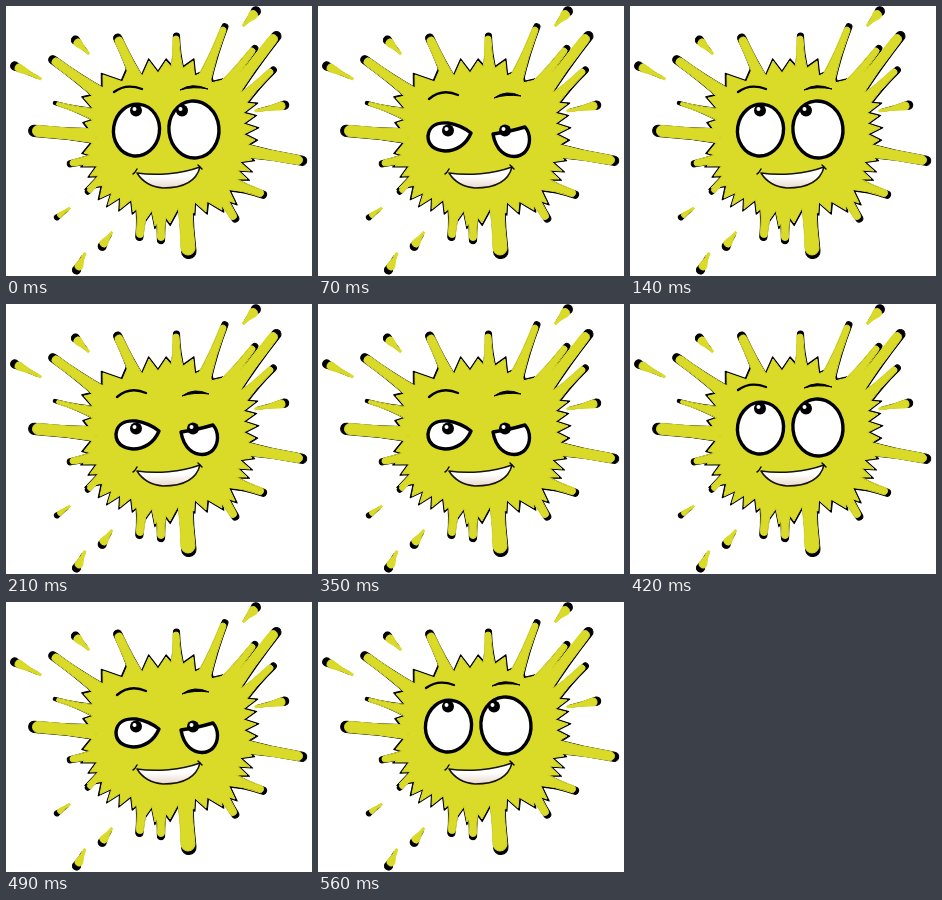
These frames come from a looping animation (306x270 px, 630 ms). An HTML page:

```html
<!DOCTYPE html>
<html lang="en">
<head>
<meta charset="utf-8">
<title>Happy splat</title>
<style>
  html, body { margin: 0; width: 100%; height: 100%; overflow: hidden; background: #fff; }
  svg { display: block; width: 306px; height: 270px; }
  .line { fill: none; stroke: #000; stroke-width: 2.3; stroke-linecap: round; }
  .eye { fill: #fff; stroke: #000; stroke-width: 3.4; stroke-linejoin: round; }
  #squint { opacity: 0; }
</style>
</head>
<body>
<svg viewBox="0 0 306 270">
  <defs>
    <linearGradient id="teeth" x2="0" y2="1">
      <stop offset=".45" stop-color="#fff"/>
      <stop offset="1" stop-color="#ead8cc"/>
    </linearGradient>
    <g id="splat" stroke-linejoin="round"></g>
    <g id="pupil"><circle r="6"/><circle cx="-1.5" cy="-1.5" r="2" fill="#fff"/></g>
  </defs>

  <use href="#splat" fill="#000" stroke="#000" transform="translate(155 130) scale(1.03) translate(-155 -130)"/>
  <use href="#splat" fill="#dadb29" stroke="#dadb29"/>

  <path d="M131 167C150 170 175 168 194 161C190 177 174 182 157 182C145 181 136 175 131 167Z"
    fill="url(#teeth)" stroke="#15120b" stroke-width="1.5" stroke-linejoin="round"/>
  <path class="line" d="M127 168Q129 167 131 163M192 159L196 163" style="stroke-width: 1.4"/>

  <g id="open">
    <path class="line" d="M108 86Q120 77 136 83"/>
    <path d="M174 84Q186 76 202 83Q187 80 174 84Z" stroke="#000"/>
    <ellipse class="eye" cx="130.5" cy="124" rx="23" ry="26" transform="rotate(8 130 124)"/>
    <ellipse class="eye" cx="188" cy="123.5" rx="25" ry="28.5" transform="rotate(-6 188 124)"/>
    <use href="#pupil" x="130" y="104.5"/>
    <use href="#pupil" x="176" y="104.5"/>
  </g>

  <g id="squint">
    <path class="line" d="M111 93Q124 82 140 89"/>
    <path d="M176 92Q188 83 203 90Q188 88 176 92Z" stroke="#000"/>
    <path class="eye" d="M110 130C111 120 119 116 130 117Q143 119 153 127C148 139 138 145 127 145C116 144 110 139 110 130Z"/>
    <path class="eye" d="M175 128Q190 126 207 121C213 128 213 139 207 146C201 152 191 152 184 146Q177 140 175 128Z"/>
    <use href="#pupil" x="130" y="124.5"/>
    <use href="#pupil" x="187" y="124.5"/>
  </g>
</svg>
<script>
  const CENTER = [155, 130], VALLEY_DEPTH = 12;
  const spikes = [
    [97, 69], [122, 63], [143, 55], [160, 55], [187, 55], [202, 64], [226, 72],
    [245, 87], [249, 98], [248, 110], [250, 122], [249, 134], [246, 154], [244, 165],
    [241, 173], [235, 185], [229, 197], [216, 204], [200, 206], [188, 207], [164, 217],
    [149, 220], [140, 213], [127, 206], [114, 203], [102, 199], [94, 192], [81, 182],
    [84, 170], [77, 160], [78, 147], [79, 117], [75, 105], [78, 92]
  ];
  // Base x, y, then tip x, y and radius.
  const arms = [
    [134, 80, 113, 35, 4], [171, 68, 170, 33, 3], [197, 76, 217, 24, 3],
    [215, 85, 246, 45, 3], [224, 89, 267, 33, 4.5], [232, 97, 264, 66, 3],
    [230, 143, 292, 154, 4.5], [222, 176, 254, 187, 3.5], [210, 182, 227, 210, 3.5],
    [179, 200, 182, 242, 7], [155, 200, 155, 231, 3.5], [137, 195, 134, 228, 3.5],
    [99, 150, 67, 157, 3], [90, 130, 32, 125, 5.5], [94, 110, 52, 98, 1.6],
    [97, 90, 50, 56, 4]
  ];
  const drops = [
    [83, 48, 72, 37, 4], [35, 73, 13, 62, 4], [237, 20, 247, 9, 4.5],
    [249, 105, 275, 100, 4], [64, 202, 54, 209, 2.5], [92, 178, 84, 184, 2.5],
    [106, 226, 98, 237, 4], [79, 247, 73, 260, 4]
  ];

  function bodyPath() {
    const points = spikes.flatMap(([x, y], i) => {
      const [nextX, nextY] = spikes[(i + 1) % spikes.length];
      const mx = (x + nextX) / 2, my = (y + nextY) / 2;
      const dx = CENTER[0] - mx, dy = CENTER[1] - my;
      const pull = VALLEY_DEPTH / Math.hypot(dx, dy);
      return [`${x} ${y}`, `${mx + dx * pull} ${my + dy * pull}`];
    });
    return `M${points.join('L')}Z`;
  }

  function limbPath([bx, by, tx, ty, r], w) {
    const len = Math.hypot(tx - bx, ty - by);
    const nx = (by - ty) / len, ny = (tx - bx) / len;
    const at = (x, y, d) => `${x + nx * d} ${y + ny * d}`;
    // The neck narrows before the rounded tip.
    const mx = (bx + tx) / 2, my = (by + ty) / 2;
    const neck = Math.min(w, r) * .75 + Math.max(w, r) * .1;
    return `M${at(bx, by, w)}Q${at(mx, my, neck)} ${at(tx, ty, r)}` +
      `A${r} ${r} 0 0 0 ${at(tx, ty, -r)}Q${at(mx, my, -neck)} ${at(bx, by, -w)}Z`;
  }

  function addPath(d) {
    const path = document.createElementNS('http://www.w3.org/2000/svg', 'path');
    path.setAttribute('d', d);
    document.getElementById('splat').append(path);
  }

  addPath(bodyPath());
  arms.forEach(arm => addPath(limbPath(arm, 7)));
  drops.forEach(drop => addPath(limbPath(drop, 1)));

  const STEPS = 9, STEP_MS = 70;
  function blink(id, parity) {
    const frames = Array.from({ length: STEPS + 1 }, (_, i) => ({
      offset: i / STEPS,
      opacity: i % STEPS % 2 === parity ? 1 : 0,
      easing: 'step-end'
    }));
    document.getElementById(id).animate(frames, { duration: STEPS * STEP_MS, iterations: Infinity });
  }
  blink('open', 0);
  blink('squint', 1);
</script>
</body>
</html>
```
